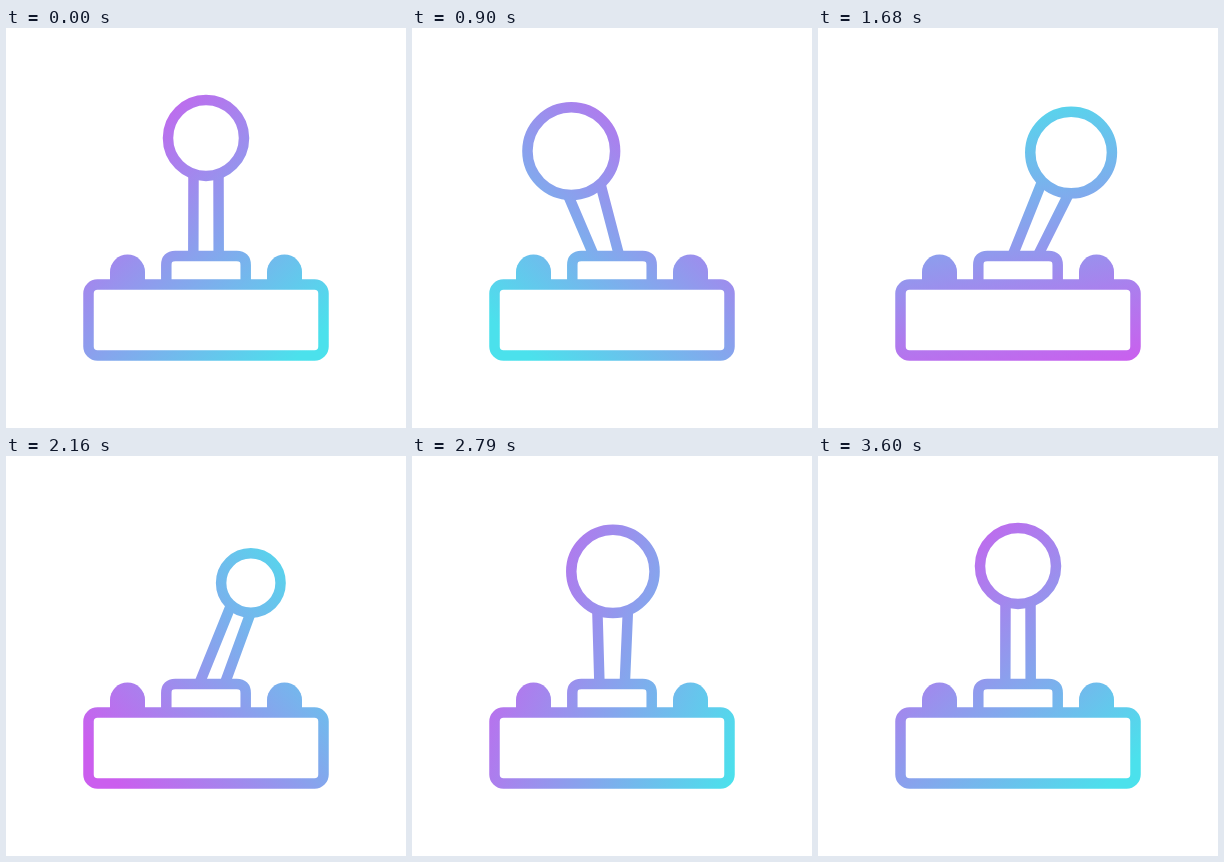
An HTML page for the animation above (5.13 s loop, 400 by 400 pixels).

```html
<!DOCTYPE html>
<html lang="en">
<head>
<meta charset="utf-8">
<title>Joystick</title>
<style>
  html, body { margin: 0; width: 100%; height: 100%; overflow: hidden; background: #fff; }
  svg { display: block; width: 100%; height: 100%; }
</style>
</head>
<body>
<svg viewBox="0 0 400 400">
  <defs>
    <linearGradient id="paint" gradientUnits="userSpaceOnUse" x1="99" y1="99" x2="311" y2="311">
      <stop offset="0" stop-color="#cb5eee"/>
      <stop offset="1" stop-color="#4be1ec"/>
    </linearGradient>
  </defs>
  <g fill="none" stroke="url(#paint)" stroke-width="10.5">
    <path id="stick"/>
    <circle id="ball" cx="200" cy="110" r="38"/>
    <path d="M160.3 256V237q0-9 9-9h61.4q9 0 9 9v19"/>
    <rect x="82.5" y="256.5" width="235" height="71" rx="9"/>
  </g>
  <g fill="url(#paint)">
    <path d="M104 254v-10a17.5 17.5 0 0 1 35 0v10z"/>
    <path d="M261 254v-10a17.5 17.5 0 0 1 35 0v10z"/>
  </g>
</svg>
<script>
const LOOP = 5130, MOVE = 3600, STEP = 30;
const paint = document.getElementById('paint');
const ball = document.getElementById('ball');
const stick = document.getElementById('stick');

const mix = (a, b, k) => a + (b - a) * k;
const swing = k => (1 - Math.cos(Math.PI * k)) / 2;

// cubic-bezier(.25, 0, .5, 1)
function spinEase(p) {
  let lo = 0, hi = 1, s = p;
  for (let i = 0; i < 24; i++) {
    s = (lo + hi) / 2;
    const x = 0.75 * s * (1 - s) ** 2 + 1.5 * s * s * (1 - s) + s ** 3;
    if (x < p) lo = s; else hi = s;
  }
  return 3 * s * s - 2 * s ** 3;
}

// Heading of the ball on its circle: -90 left, 0 front, 90 right, 180 back
const HEADINGS = [[600, -90], [1200, 0], [1680, 62], [2160, 132], [2400, 180]];

function heading(t) {
  let i = 1;
  while (i < HEADINGS.length - 1 && t > HEADINGS[i][0]) i++;
  const [t0, a0] = HEADINGS[i - 1], [t1, a1] = HEADINGS[i];
  return mix(a0, a1, (t - t0) / (t1 - t0)) * Math.PI / 180;
}

// Lean along the line of sight: -1 back, 0 upright, 1 front
function lean(k) {
  const bend = Math.abs(k) ** 1.2;
  return {
    x: 200 + Math.min(1, Math.abs(k) * 2),
    y: 110 + (k > 0 ? 14 : 18) * bend,
    r: 38 + (k > 0 ? 8 : 11.5) * k
  };
}

function ballAt(t) {
  if (t < 600) {
    const k = swing(t / 600);
    return { x: mix(200, 142, k), y: mix(110, 121, k), r: mix(38, 38.6, k) };
  }
  if (t < 2400) {
    const a = heading(t), c = Math.cos(a), x = 201 + 59 * Math.sin(a);
    if (a < 0) return { x, y: 121 + 3 * c, r: 38.6 + 7.4 * c };
    const q = (1 - c) / 2;
    return { x, y: 124 + 4 * q ** 1.5, r: 46 - 19.5 * q };
  }
  if (t < 3000) return lean(2 * swing((t - 2400) / 600) - 1);
  return lean(1 - swing((t - 3000) / 600));
}

function stickPath({ x, y, r }) {
  const foot = 200 + (x - 200) * 0.14, footY = 227;
  const len = Math.hypot(x - foot, y - footY);
  const ux = (x - foot) / len, uy = (y - footY) / len;
  const half = 12.5 * (r / 38) ** (r > 38 ? 2.2 : 0.7);
  const back = Math.sqrt(r * r - half * half);
  const side = s => {
    const topX = x - ux * back - uy * half * s;
    const topY = y - uy * back + ux * half * s;
    return `M${foot + 12.7 * s} ${footY}L${topX} ${topY}`;
  };
  return side(-1) + side(1);
}

function draw(now) {
  const t = Math.min(MOVE, Math.floor((now % LOOP) / STEP) * STEP);
  const b = ballAt(t);
  ball.setAttribute('cx', b.x);
  ball.setAttribute('cy', b.y);
  ball.setAttribute('r', b.r);
  stick.setAttribute('d', stickPath(b));
  paint.setAttribute('gradientTransform', `rotate(${360 * spinEase(t / MOVE)} 205 205)`);
}

let start;
function tick(now) {
  if (start === undefined) start = now;
  draw(now - start);
  requestAnimationFrame(tick);
}
draw(0);
requestAnimationFrame(tick);
</script>
</body>
</html>
```
